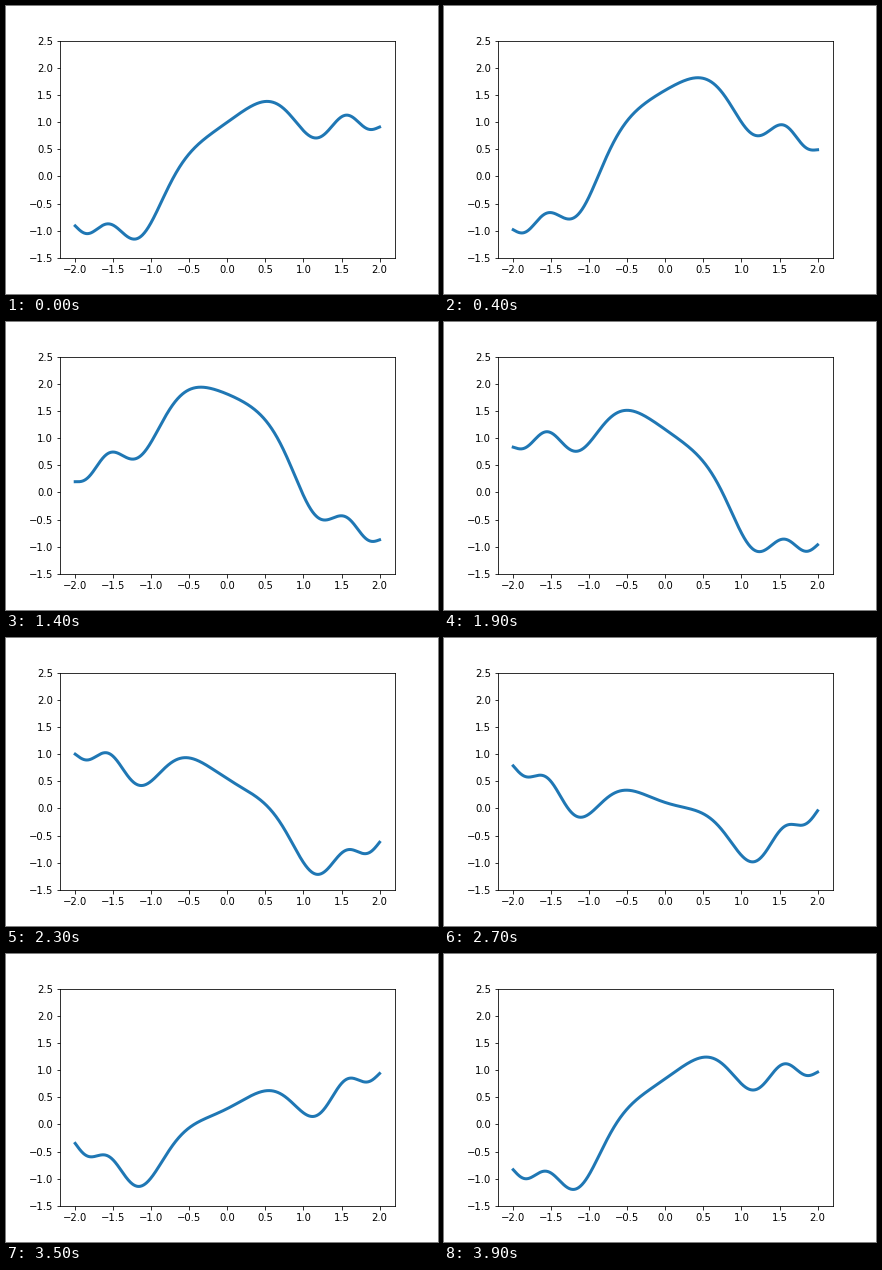
These frames come from a looping animation (432 by 288 pixels, 4 s). A matplotlib script:

```python
import numpy as np
import matplotlib.pyplot as plt
from matplotlib.animation import FuncAnimation

FRAMES = 40
INTERVAL = 100  # ms

x = np.linspace(-2, 2, 1000)
envelope = np.sinc(x ** 2)


def wave(i):
    """Sine travelling one full period per loop, on a fixed sinc bump."""
    return np.sin(x + 2 * np.pi * i / FRAMES) + envelope


fig = plt.figure(figsize=(6, 4), dpi=72, facecolor="white")
fig.subplots_adjust(left=0.125, right=0.9, bottom=0.125, top=0.88)
ax = fig.add_subplot()
ax.set_xlim(-2.2, 2.2)
ax.set_ylim(-1.5, 2.5)
ax.set_xticks(np.arange(-2, 2.1, 0.5))
ax.set_yticks(np.arange(-1.5, 2.6, 0.5))
line, = ax.plot(x, wave(0), color="#1f77b4", lw=3)


def update(i):
    line.set_ydata(wave(i))
    return line,


anim = FuncAnimation(fig, update, frames=FRAMES, interval=INTERVAL,
                     repeat=True, repeat_delay=0)
plt.show()
```
